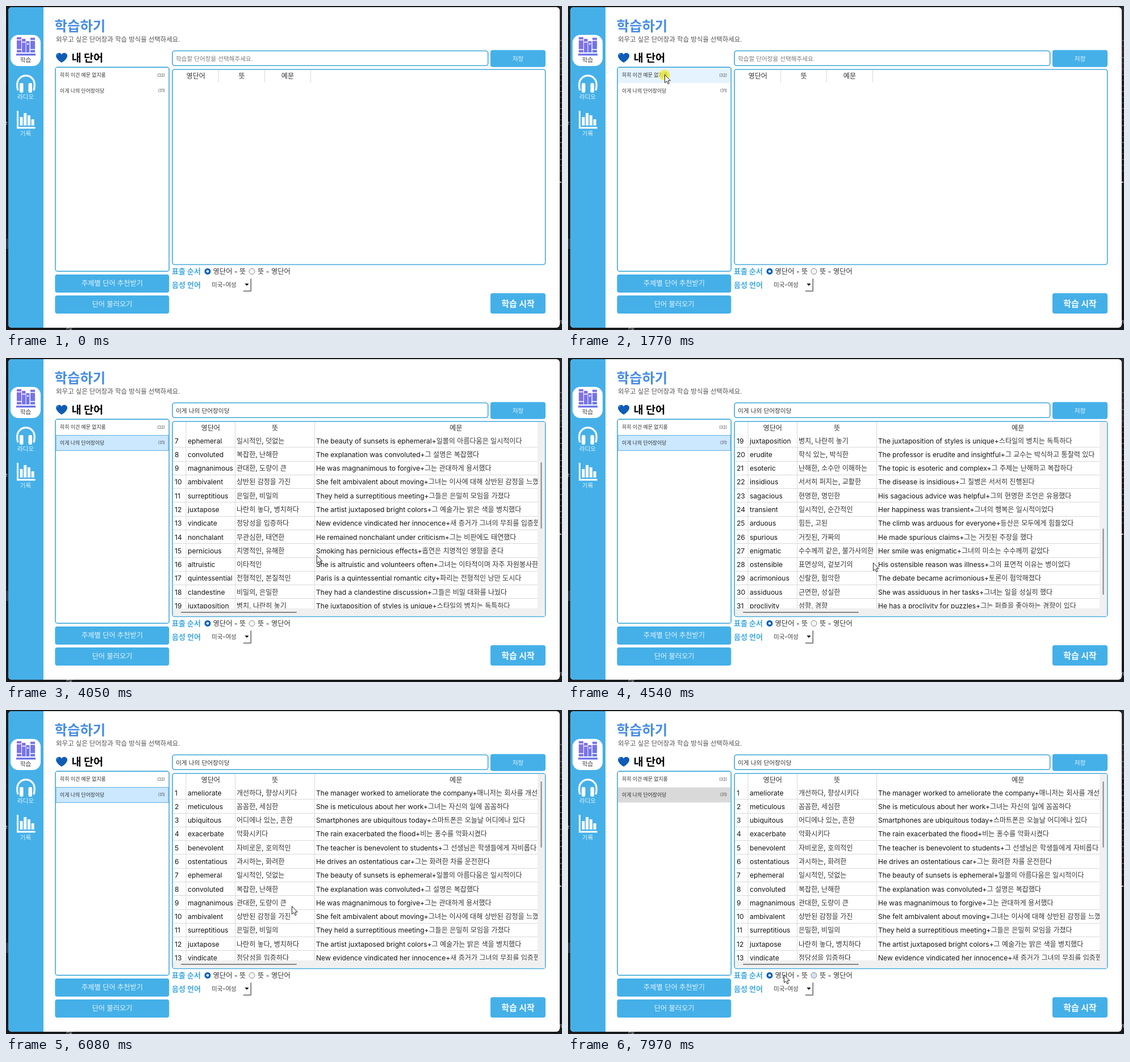
An HTML page for the animation above (8000 ms loop, 979x572 px).

```html
<!DOCTYPE html>
<html lang="ko">
<head>
<meta charset="utf-8">
<style>
html, body { margin: 0; width: 100%; height: 100%; overflow: hidden; background: #191a1c; }
svg { display: block; }
text { font-family: Inter, "Noto Sans CJK KR", "Noto Sans CJK JP", sans-serif; white-space: pre; }
tspan { font-weight: 300; fill-opacity: .86; }
</style>
</head>
<body>
<svg id="stage" width="979" height="572" viewBox="0 0 979 572"></svg>
<script>
const BLUE = '#45b0e8', EDGE = '#42a9da', LOOP = 8000;
const ROW = 24.29, TOP = 134;

// Hangul is set lighter than Latin, except in bold text
const hangul = (str, weight) =>
  weight > 500 ? str : String(str).replace(/[가-힣]+/g, '<tspan>$&</tspan>');
const rect = (x, y, w, h, fill, r = 0, more = '') =>
  `<rect x="${x}" y="${y}" width="${w}" height="${h}" rx="${r}" fill="${fill}" ${more}/>`;
const text = (x, y, size, str, fill = '#151515', weight = 400, anchor = 'start') =>
  `<text x="${x}" y="${y}" font-size="${size}" fill="${fill}" font-weight="${weight}" text-anchor="${anchor}">${hangul(str, weight)}</text>`;
const path = (d, fill, more = '') => `<path d="${d}" fill="${fill}" ${more}/>`;
const frame = (x, y, w, h) => rect(x, y, w, h, '#fff', 4, `stroke="${EDGE}" stroke-width="1.6"`);
const button = (y, label, hot) =>
  rect(86.3, y, 201, 32, hot ? '#3b9fd6' : BLUE, 4) + text(187, y + 20, 12.2, label, '#fff', 300, 'middle');

const lists = ['히히 이건 예문 없지롱', '이게 나의 단어장이당'];

const first = `ostentatious|과시하는, 화려한
pernicious|치명적인, 유해한
ameliorate|개선하다, 향상시키다
ephemeral|일시적인, 덧없는
acrimonious|신랄한, 험악한
magnanimous|관대한, 도량이 큰
juxtaposition|병치, 나란히 놓기
esoteric|난해한, 소수만 이해하는
meticulous|꼼꼼한, 세심한
sagacious|현명한, 명민한
nonchalant|무관심한, 태연한
altruistic|이타적인
proclivity|성향, 경향
arduous|힘든, 고된`;

const second = `ameliorate|개선하다, 향상시키다|The manager worked to ameliorate the company+매니저는 회사를 개선했다
meticulous|꼼꼼한, 세심한|She is meticulous about her work+그녀는 자신의 일에 꼼꼼하다
ubiquitous|어디에나 있는, 흔한|Smartphones are ubiquitous today+스마트폰은 오늘날 어디에나 있다
exacerbate|악화시키다|The rain exacerbated the flood+비는 홍수를 악화시켰다
benevolent|자비로운, 호의적인|The teacher is benevolent to students+그 선생님은 학생들에게 자비롭다
ostentatious|과시하는, 화려한|He drives an ostentatious car+그는 화려한 차를 운전한다
ephemeral|일시적인, 덧없는|The beauty of sunsets is ephemeral+일몰의 아름다움은 일시적이다
convoluted|복잡한, 난해한|The explanation was convoluted+그 설명은 복잡했다
magnanimous|관대한, 도량이 큰|He was magnanimous to forgive+그는 관대하게 용서했다
ambivalent|상반된 감정을 가진|She felt ambivalent about moving+그녀는 이사에 대해 상반된 감정을 느꼈다
surreptitious|은밀한, 비밀의|They held a surreptitious meeting+그들은 은밀히 모임을 가졌다
juxtapose|나란히 놓다, 병치하다|The artist juxtaposed bright colors+그 예술가는 밝은 색을 병치했다
vindicate|정당성을 입증하다|New evidence vindicated her innocence+새 증거가 그녀의 무죄를 입증했다
nonchalant|무관심한, 태연한|He remained nonchalant under criticism+그는 비판에도 태연했다
pernicious|치명적인, 유해한|Smoking has pernicious effects+흡연은 치명적인 영향을 준다
altruistic|이타적인|She is altruistic and volunteers often+그녀는 이타적이며 자주 자원봉사한다
quintessential|전형적인, 본질적인|Paris is a quintessential romantic city+파리는 전형적인 낭만 도시다
clandestine|비밀의, 은밀한|They had a clandestine discussion+그들은 비밀 대화를 나눴다
juxtaposition|병치, 나란히 놓기|The juxtaposition of styles is unique+스타일의 병치는 독특하다
erudite|학식 있는, 박식한|The professor is erudite and insightful+그 교수는 박식하고 통찰력 있다
esoteric|난해한, 소수만 이해하는|The topic is esoteric and complex+그 주제는 난해하고 복잡하다
insidious|서서히 퍼지는, 교활한|The disease is insidious+그 질병은 서서히 진행된다
sagacious|현명한, 명민한|His sagacious advice was helpful+그의 현명한 조언은 유용했다
transient|일시적인, 순간적인|Her happiness was transient+그녀의 행복은 일시적이었다
arduous|힘든, 고된|The climb was arduous for everyone+등산은 모두에게 힘들었다
spurious|거짓된, 가짜의|He made spurious claims+그는 거짓된 주장을 했다
enigmatic|수수께끼 같은, 불가사의한|Her smile was enigmatic+그녀의 미소는 수수께끼 같았다
ostensible|표면상의, 겉보기의|His ostensible reason was illness+그의 표면적 이유는 병이었다
acrimonious|신랄한, 험악한|The debate became acrimonious+토론이 험악해졌다
assiduous|근면한, 성실한|She was assiduous in her tasks+그녀는 일을 성실히 했다
proclivity|성향, 경향|He has a proclivity for puzzles+그는 퍼즐을 좋아하는 경향이 있다`;

const parse = s => s.split('\n').map(line => line.split('|'));
const tables = [parse(first), parse(second)];

// Slivers of the dark desktop around the window
function desktop() {
  let s = rect(0, 0, 979, 572, '#191a1c') + rect(0, 411, 4, 18, '#37383b') + rect(975, 0, 4, 118, '#2b2c2f');
  for (let i = 0; i < 24; i++) s += rect(976, 60 + i * 10, 2, 2, i % 3 ? '#4c4f54' : '#74777c');
  s += text(-5, 33, 10, 'n', '#aaa') + text(-2, 137, 9, ')', '#888') + text(-3, 210, 10, 'e', '#aaa');
  return s + rect(975, 310, 3, 2, '#bbb') + text(106, 574, 10, 'pk', '#aaa') + text(974, 561, 10, 'm', '#aaa');
}

function sidebar() {
  const ink = 'url(#ink)', white = 'none" stroke="#fff';
  let s = path('M66 2H10a6 6 0 0 0-6 6V562a6 6 0 0 0 6 6H66Z', BLUE) + rect(8, 51, 53, 55, '#fff', 14);
  for (const [x, y, w] of [[19, 55, 8], [28, 58, 6.5], [35.5, 62, 6], [43, 56, 8]]) s += rect(x, y, w, 82 - y, ink);
  s += rect(18, 84, 34, 3.5, ink);
  for (const [x, y, w] of [[19, 59, 8], [19, 76, 8], [28, 63, 6.5], [43, 60, 8], [43, 76, 8]]) s += rect(x, y, w, 1.5, '#fff');
  s += '<circle cx="38.5" cy="67" r="1.4" fill="#fff"/>';
  s += path('M21 149Q19.5 144 19.8 138a15.2 15.2 0 0 1 30.4 0Q50.5 144 49 149', white, 'stroke-width="3.2"');
  s += rect(24, 136, 6.5, 17, '#fff', 2) + rect(39.5, 136, 6.5, 17, '#fff', 2);
  s += path('M20.5 185V215H51.5', white, 'stroke-width="3"');
  [196, 189, 193, 200].forEach((y, i) => s += rect(24.5 + i * 6.7, y, 5, 211 - y, '#fff'));
  s += text(34.5, 99, 10.6, '학습', '#222', 300, 'middle');
  return s + text(34.5, 164, 10.6, '라디오', '#fff', 300, 'middle') + text(34.5, 229, 10.6, '기록', '#fff', 300, 'middle');
}

const fixed = `<defs><linearGradient id="ink" gradientUnits="userSpaceOnUse" x1="19" y1="55" x2="50" y2="88">
  <stop stop-color="#8b6fe6"/><stop offset="1" stop-color="#6577ec"/></linearGradient></defs>`
  + desktop() + rect(4, 2, 971, 566, '#fff', 6) + sidebar()
  + text(85.5, 43.6, 24.4, '학습하기', '#458ce6', 700)
  + text(88, 63.3, 11.4, '외우고 싶은 단어장과 학습 방식을 선택하세요.', '#333', 300)
  + path('M98 100C93 97 88 92 88 88A5.2 5.2 0 0 1 98 86A5.2 5.2 0 0 1 108 88C108 92 103 97 98 100Z', '#0f5cb4')
  + path('M90 88Q90 85 93 84.5', 'none', 'stroke="#2f86dc" stroke-width="1.5"')
  + text(115.5, 98, 18.6, '내 단어', '#000', 700)
  + frame(87, 108.1, 200.2, 360.3) + frame(293, 79.3, 555.7, 26) + rect(853, 77.7, 97, 30, BLUE, 4)
  + text(901.5, 96.5, 10.7, '저장', '#fff', 300, 'middle')
  + frame(293, 112, 656.7, 344.5)
  + text(292, 473, 13, '표출 순서', '#3fa9e2', 700) + text(292, 496.5, 13, '음성 언어', '#3fa9e2', 700)
  + text(364.5, 473, 12.3, '영단어 - 뜻') + text(443, 473, 12.3, '뜻 - 영단어')
  + text(362, 496, 10.6, '미국-여성', '#222')
  + path('M420.5 490H427.5L424 494Z', '#000') + path('M431.5 481V503.5H418', 'none', 'stroke="#555"')
  + path('M430.5 482V502.5H418', 'none', 'stroke="#bbb"')
  + rect(853, 507, 97, 36, BLUE, 4) + text(901.5, 530.5, 14.9, '학습 시작', '#fff', 700, 'middle');

function listRows(s) {
  return lists.map((name, i) => {
    const y = 109 + i * 27.3, picked = s.row === i;
    const fill = picked ? (s.blur ? '#d9d9d9' : '#cce8ff') : s.hover === i ? '#e5f3ff' : '#fff';
    const line = picked && !s.blur ? `stroke="${s.pressed ? '#111' : '#5aaede'}"` : '';
    return rect(88, y + .3, 198, 26.7, fill, 0, line)
      + text(95, y + 16.3, 8.85, name, '#111') + text(280, y + 15.7, 7, `(${32 - i})`, '#444', 400, 'end');
  }).join('');
}

function grid(s) {
  const names = ['영단어', '뜻', '예문'];
  const data = tables[s.table];
  const edges = !data ? [294, 374.5, 455.5, 536.5]
    : [317, s.swap ? 457 : 403.5, 543.5, s.table ? 1041 : 584.5];
  const wide = s.table === 1, bottom = wide ? 442 : 455.5;
  const line = d => path(d, 'none', 'stroke="#d9d9d9"');
  let out = `<clipPath id="head"><rect x="294" y="113" width="${data ? 642 : 655}" height="${bottom - 113}"/></clipPath>
    <clipPath id="body"><rect x="294" y="${TOP}" width="642" height="${bottom - TOP}"/></clipPath><g clip-path="url(#head)">`;
  names.forEach((n, i) => out += text((edges[i] + edges[i + 1]) / 2, 127.5, 12.2, n, '#151515', 400, 'middle'));
  edges.forEach((x, i) => { if (data || i) out += line(`M${x} 113V${data ? bottom : 135}`); });
  out += '</g>';
  if (!data) return out;

  out += '<g clip-path="url(#body)">';
  data.slice(s.scroll, s.scroll + 14).forEach((cells, i) => {
    const y = TOP + i * ROW, base = y + 16.5;
    const [a, b, c = ''] = s.swap ? [cells[1], cells[0], cells[2]] : cells;
    out += line(`M294 ${Math.round(y + ROW) - .5}H${edges[3]}`) + text(297, base, 12.05, s.scroll + i + 1);
    [a, b, c].forEach((str, k) => out += text(Math.floor(edges[k]) + 3, base, 12.05, str));
  });
  out += '</g>' + rect(936, 113, 13, 342.5, '#f0f0f0');
  out += rect(941.5, 126 + s.scroll * 175 / 18, 2, wide ? 117 : 128, '#868686', 1);
  if (wide) out += rect(294, 442, 655, 13.5, '#f0f0f0') + rect(308, 448, s.swap ? 409 : 204, 2, '#868686', 1);
  return out;
}

function radio(x, on, used) {
  return on
    ? `<circle cx="${x}" cy="468.5" r="3.9" fill="#fff" stroke="#005fb8" stroke-width="3.2"/>`
    : `<circle cx="${x}" cy="468.5" r="5" fill="${used ? '#d3e2f2' : '#f6f6f6'}" stroke="#858585"/>`;
}

// Pointer stops: time, x, y
const stops = [
  [390, 200, 524], [640, 198, 470], [900, 185, 152], [1150, 180, 255], [1220, 180, 255],
  [1570, 170, 121], [2200, 170, 121], [2510, 182, 163], [2580, 182, 163], [2720, 185, 153],
  [3130, 185, 153], [3720, 560, 330], [3780, 560, 330], [4270, 537, 361], [5140, 537, 361],
  [5350, 503, 346], [6080, 503, 346], [6350, 450, 460], [6570, 450, 460], [6880, 450, 471],
  [7420, 450, 471], [7830, 380, 467], [LOOP, 380, 467]
];
const wheel = [[3930, 3], [4020, 6], [4100, 9], [4190, 12], [4270, 15], [4540, 18], [4610, 19],
  [5140, 16], [5210, 13], [5280, 10], [5350, 7], [5680, 4], [5760, 0]];
const clicks = [1770, 2930, 6570, 7830];

function pointer(t) {
  const i = stops.findIndex(p => p[0] > t);
  if (i < 1) return null;
  const [t0, x0, y0] = stops[i - 1], [t1, x1, y1] = stops[i];
  let k = (t - t0) / (t1 - t0);
  k *= k * (3 - 2 * k);
  return [x0 + (x1 - x0) * k, y0 + (y1 - y0) * k];
}

function stateAt(t, p) {
  const inList = p && p[0] > 87 && p[0] < 287;
  const y = inList ? p[1] : 0;
  return {
    row: t < 1840 ? -1 : t < 2985 ? 0 : 1,
    pressed: t >= 1840 && t < 1980 || t >= 2985 && t < 3120,
    blur: t >= 6640,
    hover: y > 108 && y < 136 ? 0 : y >= 136 && y < 163 ? 1 : -1,
    hot: y > 511 && y < 543 ? 1 : y > 474 && y < 506 ? 0 : -1,
    table: t < 1980 ? -1 : t < 3120 ? 0 : 1,
    swap: t >= 6640 && t < 7900,
    used: t >= 6640,
    scroll: wheel.reduce((v, [at, n]) => t >= at ? n : v, 0)
  };
}

const stage = document.getElementById('stage');
stage.innerHTML = fixed + '<g id="live"></g><g id="mouse"></g>';
const live = document.getElementById('live'), mouse = document.getElementById('mouse');
let shown = '';

function draw(now) {
  const t = now % LOOP, p = pointer(t), s = stateAt(t, p), key = JSON.stringify(s);
  if (key !== shown) {
    shown = key;
    live.innerHTML = listRows(s) + button(474, '주제별 단어 추천받기', s.hot === 0) + button(511, '단어 불러오기', s.hot === 1)
      + (s.table < 0 ? text(299, 97, 10.6, '학습할 단어장을 선택해주세요.', '#666', 300) : text(299, 97, 10.7, lists[s.table], '#111'))
      + grid(s) + radio(355, !s.swap, s.used) + radio(433, s.swap, s.used);
  }
  let m = '';
  if (p) {
    if (clicks.some(c => t >= c && t < c + 55))
      m += `<circle cx="${p[0]}" cy="${p[1] + 1}" r="9.5" fill="#f0ea2c" opacity=".75"/>`;
    m += path('M0 0V14L3.2 11.2 5.4 16 7.6 15 5.5 10.3H9.8Z', '#fff',
      `stroke="#222" stroke-width="1" stroke-linejoin="round" transform="translate(${p[0] + .5} ${p[1] + .5})"`);
  }
  mouse.innerHTML = m;
}

const start = performance.now();
(function tick() {
  draw(performance.now() - start);
  requestAnimationFrame(tick);
})();
</script>
</body>
</html>
```
